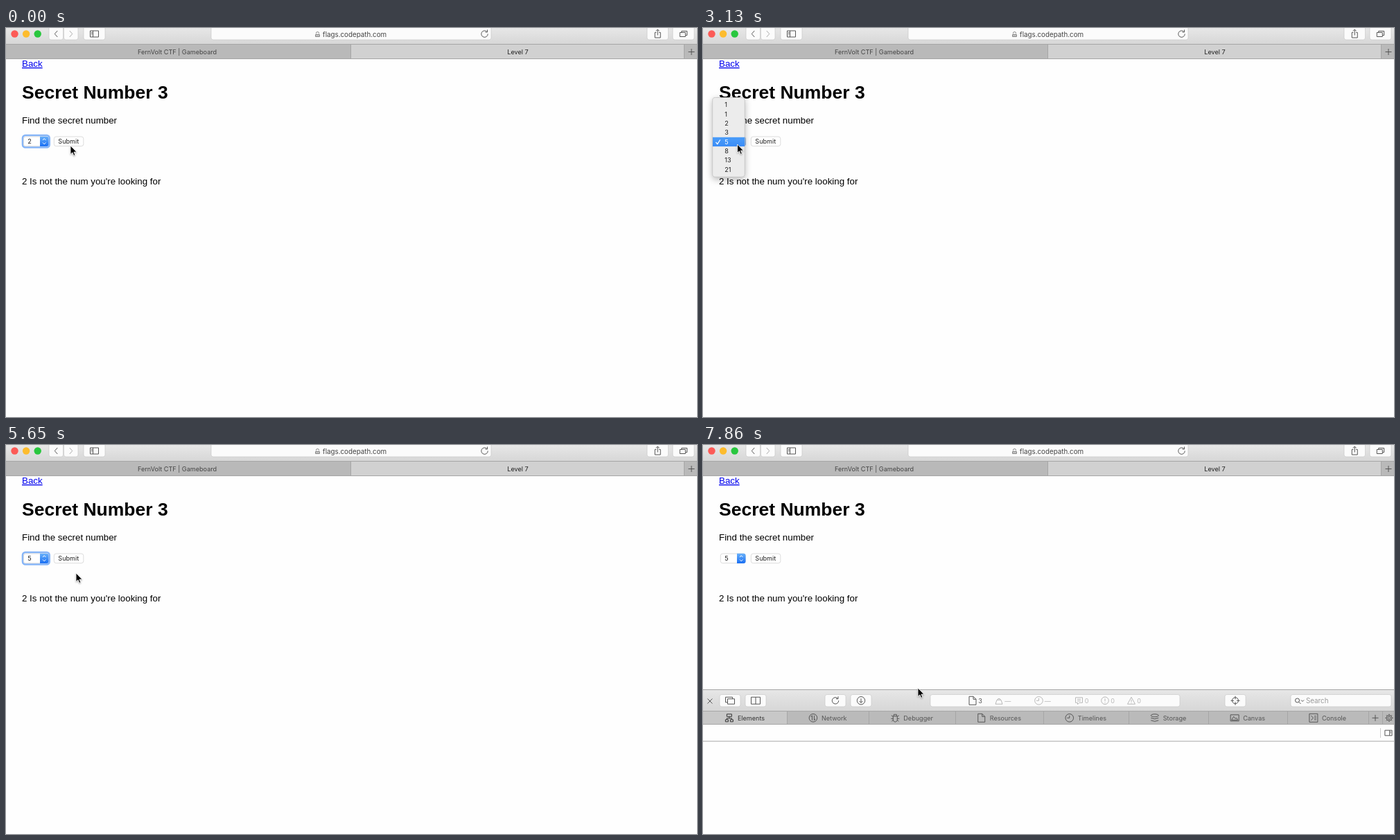
Write an HTML page that moves like this. It is 997 px wide and 562 px high and loops after 8000 ms.

```html
<!DOCTYPE html>
<html lang="en">
<head>
<meta charset="utf-8">
<title>Secret Number 3</title>
<style>
  html, body { margin: 0; width: 100%; height: 100%; overflow: hidden; background: #fefefe; }
  svg { display: block; }
  .page { font: 13.33px "Liberation Sans", Arial, sans-serif; }
  .page .title { font-size: 26.5px; font-weight: bold; }
  .ui { font: 9.1px Inter, sans-serif; fill: #222; }
  .ui .large { font-size: 9.8px; }
  .ui .menu { font-size: 11.1px; }
  .mid { text-anchor: middle; }
  .button { fill: #fbfbfb; stroke: #c4c4c4; stroke-width: .6; }
  .icon { fill: none; stroke: #555; vector-effect: non-scaling-stroke; }
  .line { stroke: #a6a6a6; }
  .panel { fill: #ececec; stroke: #bdbdbd; stroke-width: .7; filter: drop-shadow(0 3px 5px rgba(0, 0, 0, .28)); }
  .picked { fill: url(#pick); }
  .white { fill: #fff; }
  #cursor { stroke: #fff; stroke-width: .9; filter: drop-shadow(0 1px 1px rgba(0, 0, 0, .3)); }
</style>
</head>
<body>
<svg width="997" height="562" viewBox="0 0 997 562">
  <defs>
    <linearGradient id="bar" x2="0" y2="1"><stop stop-color="#e7e7e7"/><stop offset="1" stop-color="#d6d6d6"/></linearGradient>
    <linearGradient id="blue" x2="0" y2="1"><stop stop-color="#69b1fa"/><stop offset="1" stop-color="#1a6ff3"/></linearGradient>
    <linearGradient id="pick" x2="0" y2="1"><stop stop-color="#4b9df9"/><stop offset="1" stop-color="#3a8cf6"/></linearGradient>
  </defs>

  <g id="browser" class="ui">
    <rect width="997" height="24" fill="url(#bar)"/>
    <rect y="24" width="997" height="20" fill="#b9b9b9"/>
    <rect x="498" y="24" width="480" height="20" fill="#d1d1d1"/>
    <path class="line" d="M0 23.5H997M0 44.5H997M497.5 24V44M978.5 24V44"/>
    <text class="mid" x="247" y="37.5" fill="#444">FernVolt CTF | Gameboard</text>
    <text class="mid" x="738.5" y="37.5">Level 7</text>
  </g>

  <g class="page">
    <text x="23" y="56" fill="#00e" text-decoration="underline">Back</text>
    <text x="23" y="101.5" class="title">Secret Number 3</text>
    <text x="23" y="137.7">Find the secret number</text>
    <text x="23" y="226.2">2 Is not the num you're looking for</text>
  </g>

  <g id="form" class="ui">
    <rect id="ring" x="24" y="155" width="38.7" height="17.5" rx="4" fill="none" stroke="#86b5f7" stroke-width="2.6"/>
  </g>

  <g id="inspector" class="ui">
    <rect y="353" width="997" height="32" fill="url(#bar)"/>
    <rect y="385" width="997" height="18" fill="#bababa"/>
    <path class="line" d="M0 353.5H997M0 384.5H997M0 403.5H997M0 428H997M980.5 385V403"/>
    <path d="M977.5 409V423" stroke="#ccc"/>
  </g>

  <g id="popup" class="ui"></g>
  <g id="context" class="ui"></g>
  <path id="cursor" d="M0 0V12.5L2.9 9.9L4.8 14.4L6.9 13.5L5 9.2H9Z"/>
</svg>
<script>
const LOOP = 8000, TICK = 148.3, ROW = 13.33;
const $ = id => document.getElementById(id);
const add = (id, markup) => $(id).insertAdjacentHTML('beforeend', markup);
const show = (id, on) => $(id).style.display = on ? '' : 'none';
const text = (x, y, s, cls = '', fill = '') =>
  `<text x="${x}" y="${y}" class="${cls}" ${fill && `fill="${fill}"`}>${s}</text>`;
const rect = (cls, x, y, w, h, r = 0) =>
  `<rect class="${cls}" x="${x}" y="${y}" width="${w}" height="${h}" rx="${r}"/>`;
const ring = r => `M${-r} 0a${r} ${r} 0 1 0 ${2 * r} 0a${r} ${r} 0 1 0 ${-2 * r} 0`;

// Line icons drawn around their own centre
const glyphs = {
  chevron: 'M2 -4.5L-2 0L2 4.5',
  sidebar: 'M-6 -4.5H6V4.5H-6ZM-2 -4.5V4.5M-4.5 -2H-3M-4.5 0H-3',
  split: 'M-6.5 -5H6.5V5H-6.5ZM0 -5V5',
  windows: 'M-3.5 2.5H-6.5V-5H3.5V-2.5M-3.5 -2.5H6.5V5H-3.5Z',
  share: 'M-2 -2H-4V5.5H4V-2H2M0 2V-6M-2.5 -4L0 -6.5L2.5 -4',
  reload: 'M3 -3.5A4.7 4.7 0 1 0 4.7 0M4 -6V-2.5H1',
  lock: 'M-2 -1V-2A2 2 0 0 1 2 -2V-1M-3 0H3V3H-3ZM-3 1.5H3',
  plus: 'M-4.5 0H4.5M0 -4.5V4.5',
  close: 'M-3.5 -3.5L3.5 3.5M3.5 -3.5L-3.5 3.5',
  download: ring(5.7) + 'M0 -3V3M-2.5 .7L0 3.2L2.5 .7',
  target: ring(4.5) + 'M0 -6.5V-2M0 2V6.5M-6.5 0H-2M2 0H6.5',
  search: ring(3) + 'M2.2 2.2L5 5M5.5 -.5L7.5 1.5L9.500 -.5',
  document: 'M-5 -6H1L5 -2V6H-5ZM1 -6V-2H5',
  weight: 'M-3 -1H3L5 5H-5ZM-2 -1A2 2 0 1 1 2 -1',
  clock: ring(5.8) + 'M0 -3.5V0H-3.5',
  message: 'M-5 -4.5H5V3H.5L-2 5.500V3H-5ZM-2.5 -2H2.5M-2.5 .5H2.5',
  alert: ring(5.3) + 'M0 -3V1M0 2.500V3.500',
  warning: 'M0 -5L5.5 5H-5.5ZM0 -1.500V2M0 3V4',
  tree: 'M-3.5 -5.500H3.5V-2H-3.5ZM0 -2V.5M-3.5 2.500V.5H3.5V2.500M-5.5 2.500H-1.5V5.500H-5.5ZM1.5 2.500H5.5V5.500H1.5Z',
  network: ring(5.8) + 'M-1.5 3.500V-3.500L-3.5 -1.500M1.5 -3.500V3.500L3.5 1.500',
  bug: 'M-3 -2.500H3V4L0 6L-3 4ZM-2 -2.500V-5H2V-2.500M-6 1H-3M3 1H6M-5.500 -3.500L-3 -2M5.500 -3.500L3 -2M-5 5L-3 3M5 5L3 3',
  disks: 'M-5.500 -3.500a5.500 2 0 1 0 11 0a5.500 2 0 1 0 -11 0M-5.500 0Q0 3 5.500 0M-5.500 3.500Q0 6.500 5.500 3.500',
  picture: 'M-6 -4.500H6V4.500H-6ZM-4.500 3L-1.500 -2L1 1L2.500 0L4.500 3Z',
  script: 'M-6 -6H6V6H-6ZM-3.500 -3.500L-.5 0L-3.500 3.500M1 -2.500H4M1 0H4M1 2.500H4',
  gear: ring(2) + ring(4) + Array.from({ length: 8 }, (_, i) => `M${[4, 5.7].map(r =>
    [r * Math.cos(i * Math.PI / 4), r * Math.sin(i * Math.PI / 4)]).join('L')}`).join('')
};
// A negative size mirrors the icon left to right
const icon = (name, x, y, color = '#555', size = 1) =>
  `<path class="icon" d="${glyphs[name]}" style="stroke:${color}" transform="translate(${x} ${y}) scale(${size} ${Math.abs(size)})"/>`;
const button = (x, y, w, h, name, color, size) =>
  rect('button', x, y, w, h, 3) + (name ? icon(name, x + w / 2, Math.max(8.5, y + h / 2), color, size) : '');

function buildBrowser() {
  const tool = (x, w, ...glyph) => button(x, -4, w, 21, ...glyph);
  ['#fc5b57', '#fdbc2e', '#29c73f'].forEach((c, i) =>
    add('browser', `<circle cx="${12.5 + 16.6 * i}" cy="8.5" r="5.2" fill="${c}"/>`));
  add('browser', tool(62, 20.5, 'chevron') + tool(83.5, 20.5, 'chevron', '#aaa', -1) +
    tool(112, 31, 'sidebar') + tool(296, 404) + tool(925, 30.5, 'share') +
    tool(962, 31, 'windows', '#555', -.8) + icon('lock', 449.5, 9.5, '#8a8a8a') +
    text(457, 12.5, 'flags.codepath.com', 'large', '#444') +
    icon('reload', 690.5, 8.5) + icon('plus', 989, 34.5));
}

function buildForm() {
  add('form', rect('button white', 25.3, 157, 36, 13.7, 3) +
    '<path d="M49 156.7h9.5q3 0 3 3V168q0 3-3 3H49Z" fill="url(#blue)"/>' +
    '<path d="M53 162l2.2-2.3 2.2 2.3M53 165.500l2.2 2.3 2.2-2.3" fill="none" stroke="#fff"/>' +
    '<text id="value" x="31.3" y="167.2"></text>' +
    rect('button white', 69.3, 157, 42.5, 13.7, 3) + text(90.3, 167.2, 'Submit', 'mid'));
}

function buildInspector() {
  const tool = (x, w, name) => button(x, 360.5, w, 17.5, name);
  add('inspector', icon('close', 10, 370) + tool(24, 30, 'windows') + tool(61, 30, 'split') +
    tool(176, 30, 'reload') + tool(213, 30, 'download') + tool(328, 360) +
    tool(753, 30, 'target') + tool(848, 145) + icon('search', 857.5, 369) +
    text(870, 373, 'Search', 'large', '#999'));

  const counters = { document: [389, 3], weight: [427, '—'], clock: [484.5, '—'],
    message: [542.5, 0], alert: [580, 0], warning: [618, 0] };
  for (const [name, [x, value]] of Object.entries(counters)) {
    const color = name === 'document' ? '#555' : '#b8b8b8';
    add('inspector', icon(name, x, 369.3, color) + text(x + 8.3, 373, value, '', color));
  }

  // Every tab is as wide as its label plus an equal share of the free space
  const tabs = Object.entries({ Elements: 'tree', Network: 'network', Debugger: 'bug', Resources: 'document',
    Timelines: 'clock', Storage: 'disks', Canvas: 'picture', Console: 'script' });
  add('inspector', '<text id="ruler"></text>');
  const widths = tabs.map(([label]) => {
    $('ruler').textContent = label;
    return $('ruler').getComputedTextLength() + 18;
  });
  $('ruler').remove();
  const space = (960 - widths.reduce((a, b) => a + b)) / tabs.length;
  let x = 0;
  tabs.forEach(([label, name], i) => {
    const w = widths[i] + space, left = x + space / 2;
    const color = i ? '#555' : '#333';
    if (!i) add('inspector', `<rect y="385" width="${w}" height="18" fill="#c8c8c8"/>`);
    x += w;
    add('inspector', icon(name, left + 6, 394.3, color) + text(left + 18, 397.7, label, '', color) +
      `<path class="line" d="M${Math.round(x) + .5} 385v18"/>`);
  });
  add('inspector', icon('plus', 970, 394.3) + icon('gear', 990, 394.3) + icon('sidebar', 989, 416, '#555', -.85));
}

function buildContext() {
  add('context', rect('panel', 103, 180.5, 134.5, 122.5, 4));
  let y = 196;
  for (const item of ['Back', 'Reload Page', '', 'Show Page Source', 'Save Page As...', 'Print Page...', '', 'Inspect Element']) {
    const last = item.startsWith('Inspect');
    if (last) add('context', `<rect id="contextPick" class="picked" x="103" y="${y - 12}" width="134.3" height="16.2"/>`);
    add('context', item ? `<text class="menu" ${last ? 'id="inspect"' : ''} x="120.7" y="${y}">${item}</text>`
      : `<path d="M103 ${y - 6.3}h134" stroke="#d2d2d2"/>`);
    y += item ? 15.9 : 9.9;
  }
}

// Pointer moves: first tick, last tick, then where it rests
const moves = [
  [0, 5, 52, 176], [11, 12, 51, 168], [13, 16, 50.5, 183.5], [20, 21, 49.5, 168], [23, 25, 49, 175.5],
  [26, 34, 65, 189], [34, 38, 101, 185], [39, 42, 206, 300.5], [43, 45, 207, 287.3], [49, 53, 310, 351]
];
// Number lists: opening tick, fading tick, checked row
const popups = [[4, 10, 2], [12, 19, 3], [21, 35, 4]];
const numbers = [1, 1, 2, 3, 5, 8, 13, 21];

function pointerAt(n) {
  let x = 93, y = 170;
  for (const [from, to, toX, toY] of moves) {
    const k = Math.min(1, Math.max(0, (n - from) / (to - from)));
    const ease = k * k * (3 - 2 * k);
    x += (toX - x) * ease;
    y += (toY - y) * ease;
  }
  return [x, y];
}

function popupMarkup(checked, x, y) {
  const top = 153.8 - ROW * checked;
  const picked = x < 60.5 ? Math.floor((y - top - 4) / ROW) : -1;
  const rows = numbers.map((value, i) => {
    const rowTop = top + 4 + ROW * i;
    return (i === picked ? rect('picked', 14, rowTop, 46, ROW) : '') +
      text(31.3, rowTop + 9.9, value, i === picked ? 'white' : '');
  });
  const check = `<path d="M18.5 165l2.3 2.7 4-6.2" fill="none" stroke="${picked === checked ? '#fff' : '#222'}" stroke-width="1.2"/>`;
  return rect('panel', 13.7, top, 46.6, 114.7, 4) + rows.join('') + check;
}

function draw(n) {
  const [x, y] = pointerAt(n);
  $('cursor').setAttribute('transform', `translate(${x} ${y})`);

  const popup = popups.find(([open, fade]) => n >= open && n <= fade);
  $('popup').innerHTML = popup ? popupMarkup(popup[2], x, y) : '';
  $('popup').style.opacity = popup && n === popup[1] ? .55 : 1;
  $('value').textContent = n < 11 ? 2 : n < 20 ? 3 : 5;
  show('ring', !popup && n < 40);

  // The chosen item blinks once before its menu fades
  const picked = n >= 44 && n !== 47;
  show('context', n >= 40 && n < 49);
  $('context').style.opacity = n === 48 ? .5 : 1;
  show('contextPick', picked);
  $('inspect').style.fill = picked ? '#fff' : '';
  show('inspector', n >= 50);
}

buildBrowser();
buildForm();
buildInspector();
buildContext();

let last = -1;
function frame() {
  const n = Math.min(53, Math.floor(performance.now() % LOOP / TICK));
  if (n !== last) draw(last = n);
  requestAnimationFrame(frame);
}
frame();
</script>
</body>
</html>
```
